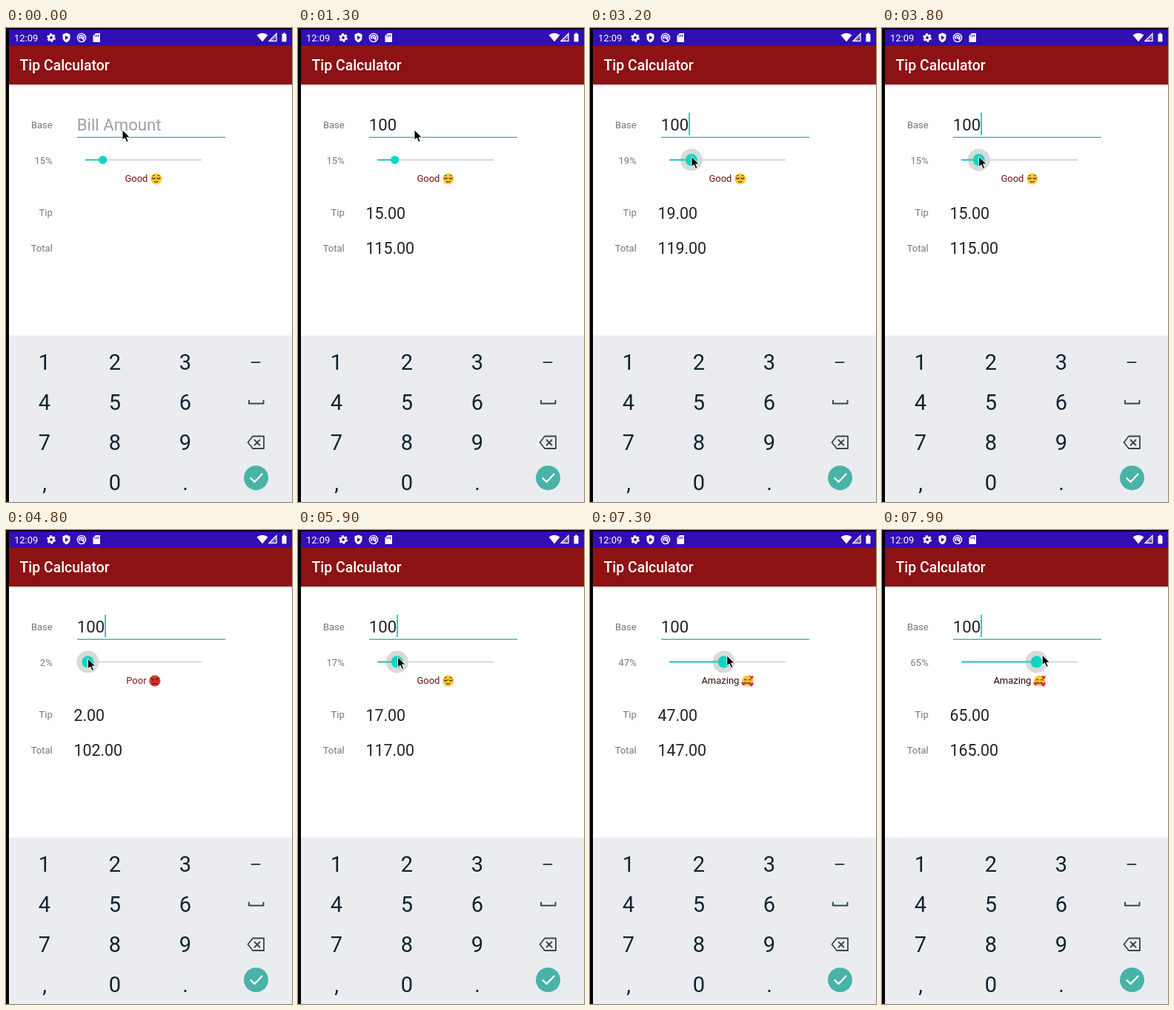
An HTML page for the animation above (8000 ms loop, 386 px wide and 638 px high).

```html
<!DOCTYPE html>
<html lang="en">
<head>
<meta charset="utf-8">
<title>Tip Calculator</title>
<style>
html, body { margin: 0; width: 100%; height: 100%; overflow: hidden; background: #000; }
svg { display: block; width: 386px; height: 638px; font-family: Roboto, sans-serif; }
.label { font-size: 13px; fill: #777; text-anchor: end; }
.amount { font-size: 21.4px; fill: #222; }
.key { font-size: 29px; fill: #0d2530; text-anchor: middle; }
.line { fill: none; stroke-linecap: round; stroke-linejoin: round; }
</style>
</head>
<body>
<svg viewBox="0 0 386 638">
  <defs>
    <linearGradient id="shade" x2="0" y2="1">
      <stop stop-color="#000" stop-opacity=".2"/><stop offset="1" stop-color="#000" stop-opacity="0"/>
    </linearGradient>
    <path id="heart" d="M0 2.6C-5 -1-2-4 0-1.6C2-4 5-1 0 2.6Z" fill="#e5264c"/>
  </defs>
  <rect width="386" height="638"/>
  <rect x="4" y="76" width="382" height="562" fill="#fff"/>
  <rect x="4" y="2" width="382" height="22" fill="#320eb3"/>
  <rect x="4" y="24" width="382" height="52" fill="#8c1214"/>
  <rect x="4" y="76" width="382" height="3" fill="url(#shade)"/>
  <text x="18.5" y="56.7" font-size="19.4" font-weight="500" fill="#fff">Tip Calculator</text>

  <g fill="#fff">
    <text x="11" y="17.6" font-size="13">12:09</text>
    <circle cx="61" cy="13" r="3.2" fill="none" stroke="#fff" stroke-width="2.6"/>
    <circle cx="61" cy="13" r="5" fill="none" stroke="#fff" stroke-width="1.8" stroke-dasharray="2.8 2.436"/>
    <path d="M81.500 6.500L86.500 8.500V12.500Q86.500 17.500 81.500 19.500Q76.500 17.500 76.500 12.500V8.500Z"/>
    <path d="M80 10V16L84.500 13Z" fill="#320eb3"/>
    <g class="line" stroke="#fff" stroke-width="1.4">
      <circle cx="102" cy="13" r="5.6"/>
      <path d="M99.500 14.500A3 3 0 1 1 104.500 14.500M102 13L105.500 16.500"/>
    </g>
    <circle cx="102" cy="12.800" r="1.6"/>
    <path d="M121 7H127V19H117.500V10.500Z"/>
    <path d="M120 9.500V12M122.200 9V12M124.400 9V12" stroke="#320eb3"/>
    <path d="M338.500 9.500Q346 4 353.500 9.500L346 18.500Z"/>
    <path d="M365 7.500V17.500H355Z" fill="none" stroke="#fff" stroke-width="1.3"/>
    <path d="M365 7V13L359.500 18H354.500Z" opacity=".35"/>
    <path d="M372.500 8H374.300V6.500H376.700V8H378.500V18.500H372.500Z"/>
  </g>

  <g class="label">
    <text x="62.700" y="134.700">Base</text>
    <text id="percent" x="62.700" y="182.500"></text>
    <text x="62.700" y="252.800">Tip</text>
    <text x="62.700" y="300.700">Total</text>
  </g>
  <text id="base" x="95.700" y="138" font-size="22.2"></text>
  <path d="M96 147.200H296" stroke="#36bfb0" stroke-width="1.5"/>
  <rect id="caret" y="114" width="1.800" height="30" fill="#13cdbb"/>
  <text id="tip" class="amount" x="91.400" y="256.500"></text>
  <text id="total" class="amount" x="91.400" y="304.200"></text>

  <path d="M107.500 177.500H264" stroke="#d8d8d8" stroke-width="1.800"/>
  <circle id="halo" cy="177.500" r="15" fill="#d8d9d9"/>
  <path id="track" stroke="#1ccbbb" stroke-width="2"/>
  <circle id="thumb" cy="177.500" fill="#03d8c4"/>
  <text id="rating" y="207.200" font-size="13"></text>
  <g id="face"></g>

  <rect x="4" y="413" width="382" height="2" fill="#f5f6f7"/>
  <rect x="4" y="415" width="382" height="223" fill="#eaecf0"/>
  <g id="keys" class="key"></g>
  <g class="line" stroke="#36474f" stroke-width="2">
    <path d="M331.500 450H342.500"/>
    <path d="M328 501.500V505.500H347.500V501.500"/>
    <path d="M333 549.500H348V566H333L326.500 557.700ZM335.500 554.500L342.500 561.500M342.500 554.500L335.500 561.500" stroke-width="1.800"/>
  </g>
  <circle cx="337.500" cy="605.500" r="16.500" fill="#49b3a8"/>
  <path class="line" d="M330.500 606L335.500 611L345.500 600.500" stroke="#fff" stroke-width="2.200"/>

  <path id="pointer" d="M0 0V14L3.300 11L5.700 16.500L8.200 15.400L5.800 10.200H10.300Z"
    stroke="#fff" stroke-width="1" stroke-linejoin="round"/>
</svg>
<script>
const $ = id => document.getElementById(id);
const set = (id, attrs) => Object.entries(attrs).forEach(([k, v]) => $(id).setAttribute(k, v));
const LOOP = 8000, STEP = 100;

// Each key point is [time, value, ...more values].
const percentPath = [[2600, 15], [3200, 19], [3500, 21], [4300, 5], [4500, 2], [4800, 2], [5900, 17], [6700, 29], [7900, 65]];
const pointerPath = [[1400, 157, 137], [2100, 140, 172], [2400, 131, 173], [2600, 131, 173]];
const dragPath = [[2600, 0, 173], [4800, 0, 173], [5900, .8, 171], [6700, .8, 170], [7900, 7.500, 168]];

function at(path, t) {
  if (t <= path[0][0]) return path[0].slice(1);
  const i = path.findIndex(p => p[0] >= t);
  if (i < 0) return path[path.length - 1].slice(1);
  const a = path[i - 1], b = path[i], k = (t - a[0]) / (b[0] - a[0]);
  return a.slice(1).map((v, j) => v + (b[j + 1] - v) * k);
}

const skin = color => `<circle r="7.600" fill="${color}"/>`;
const strokes = (d, color = '#4d3420') => `<path class="line" d="${d}" stroke="${color}" stroke-width="1.200"/>`;
const heart = (x, y, s) => `<use href="#heart" transform="translate(${x} ${y}) scale(${s})"/>`;
const yellow = skin('#fcc934');
const ratings = [
  [10, 'Poor', skin('#d9362e') + strokes('M-5 -3.500L-1.500 -1.500M5 -3.500L1.500 -1.500M-3 4.500Q0 2 3 4.500M-3.500 0H-2.500M2.500 0H3.500', '#40131a')],
  [15, 'Acceptable', yellow + strokes('M-3 -2V-1M3 -2V-1M-3 3.500H3')],
  [20, 'Good', yellow + strokes('M-5.300 -1Q-3.300 1 -1.300 -1M1.300 -1Q3.300 1 5.300 -1M-2.300 3.500Q0 5 2.300 3.500M-4.500 -4L-2.500 -4.500M2.500 -4.500L4.500 -4')],
  [25, 'Great', yellow + strokes('M-4.500 -1Q-3 -3 -1.500 -1M1.500 -1Q3 -3 4.500 -1M-4 2.500Q0 6.500 4 2.500')],
  [101, 'Amazing', yellow + strokes('M-4.500 -1Q-3 -3 -1.500 -1M1.500 -1Q3 -3 4.500 -1M-3 2Q0 5 3 2') +
    heart(-5.500, 4, 1) + heart(5, 5, 1.100) + heart(5.500, -4.500, .900)]
];

['123', '456', '789', ',0.'].forEach((row, r) => [...row].forEach((char, c) => {
  $('keys').innerHTML += `<text x="${52 + 95 * c}" y="${460.200 + 54 * r}">${char}</text>`;
}));

function showRating(percent) {
  const [, name, face] = ratings.find(r => percent < r[0]);
  const rating = $('rating'), fade = 1 - percent / 100;
  rating.textContent = name;
  const width = rating.getComputedTextLength();
  const left = 185.600 - (width + 19.400) / 2;
  set('rating', { x: left, fill: `rgb(${[130, 22, 22].map(v => Math.round(v * fade))})` });
  $('face').innerHTML = face;
  set('face', { transform: `translate(${left + width + 11.300} 203)` });
}

function draw(time) {
  const t = Math.floor(time / STEP) * STEP;
  const percent = Math.round(at(percentPath, t)[0]);
  const typed = t < 500 ? '' : t < 700 ? '1' : t < 800 ? '10' : '100';
  const bill = Number(typed), tip = bill * percent / 100;
  const dragging = t >= 2600;
  const x = 107.300 + 1.560 * percent;

  $('base').textContent = typed || 'Bill Amount';
  set('base', { fill: typed ? '#222' : '#a0a0a0' });
  $('percent').textContent = percent + '%';
  $('tip').textContent = typed && tip.toFixed(2);
  $('total').textContent = typed && (bill + tip).toFixed(2);

  const blink = t < 800 ? t >= 300 : (t - 800) % 1000 < 500;
  const end = typed ? $('base').getComputedTextLength() : 0;
  set('caret', { x: 95.700 + end, opacity: blink ? 1 : 0 });

  set('track', { d: `M107.300 177.500H${x}` });
  set('thumb', { cx: x, r: dragging ? 8 : 5.600 });
  set('halo', { cx: x, opacity: dragging ? 1 : 0 });
  showRating(percent);

  let [px, py] = at(pointerPath, t);
  if (dragging) {
    const [lead, y] = at(dragPath, t);
    px = x + lead;
    py = y;
  }
  set('pointer', { transform: `translate(${px} ${py})` });
}

let start;
function tick(now) {
  start ??= now;
  draw((now - start) % LOOP);
  requestAnimationFrame(tick);
}
draw(0);
requestAnimationFrame(tick);
</script>
</body>
</html>
```
